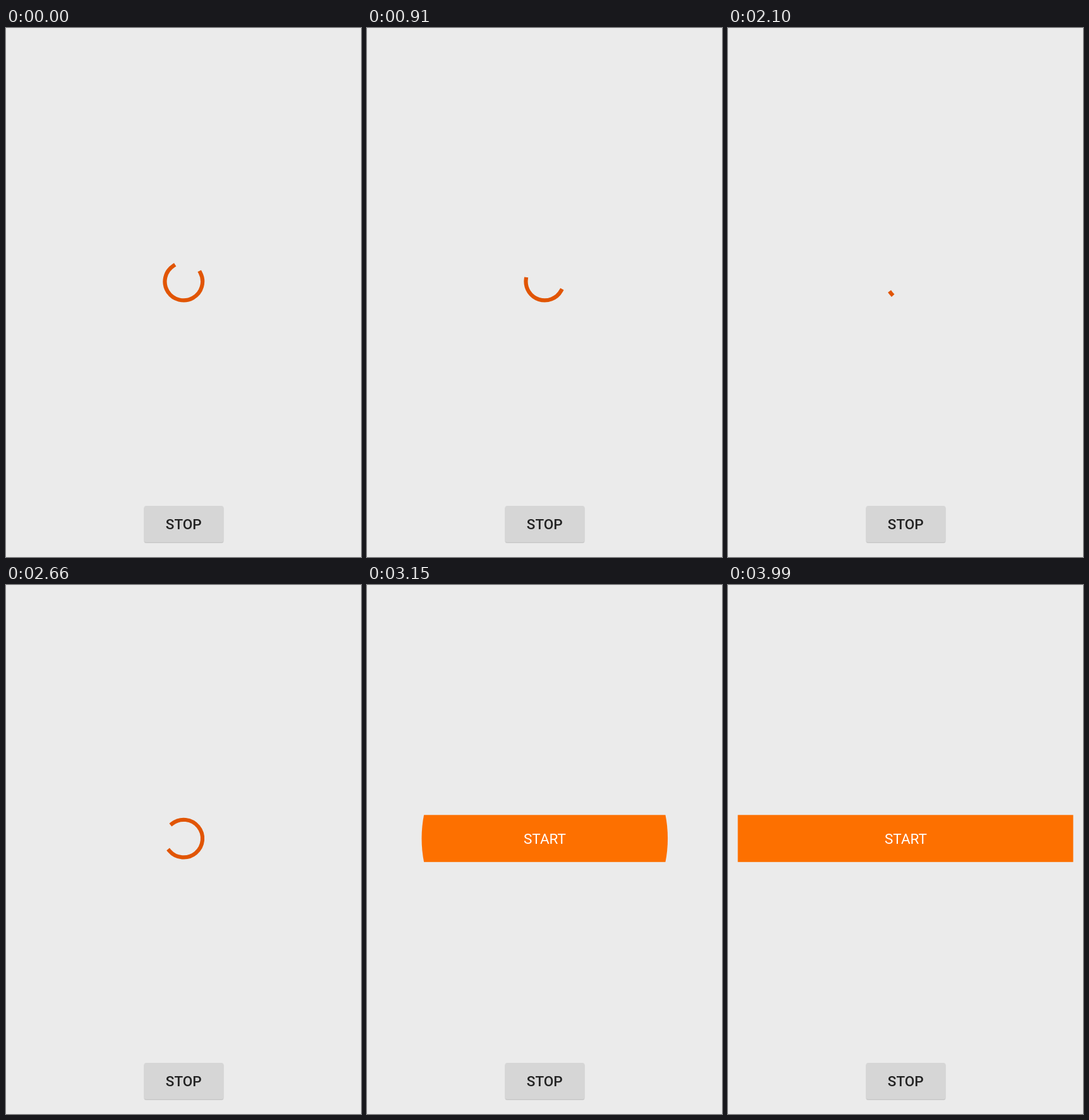
Write an HTML page that moves like this. It is 562 by 838 pixels and loops after 4.55 s.

```html
<!DOCTYPE html>
<html lang="en">
<head>
<meta charset="utf-8">
<title>Loading button</title>
<style>
  html, body { margin: 0; width: 100%; height: 100%; overflow: hidden; background: #ebebeb; }
  svg { display: block; width: 100%; height: 100%; }
  text { font: 500 22.5px Roboto, "Open Sans", sans-serif; text-anchor: middle; }
</style>
</head>
<body>
<svg viewBox="0 0 562 838">
  <defs>
    <clipPath id="reveal"><circle id="hole" cx="281.3" cy="401.6" r="0"/></clipPath>
  </defs>
  <rect width="562" height="838" fill="#ebebeb"/>
  <path id="arc" fill="none" stroke="#e15504" stroke-width="6.2" stroke-linecap="square"/>
  <g id="start" clip-path="url(#reveal)">
    <rect x="15.5" y="364.3" width="531" height="74.5" fill="#fd7000"/>
    <text x="281.5" y="410" fill="#fff" style="font-weight:400">START</text>
  </g>
  <rect x="218.5" y="758" width="126" height="58" rx="3.5" fill="#c9c9c9"/>
  <rect x="218.5" y="757" width="126" height="57.5" rx="3.5" fill="#d6d6d6"/>
  <text x="281.3" y="794" fill="#222">STOP</text>
</svg>
<script>
const LOOP = 4550, STEP = 70;
const CX = 281.3, CY = 401.6, R = 29.8;
const CYCLE = 20;           // steps per spinner cycle
const PHASE = 0.543;        // spinner phase at the start of the loop
const REVEAL = 39, REVEAL_STEPS = 12.57, REVEAL_R = 268;

const arc = document.getElementById('arc');
const start = document.getElementById('start');
const hole = document.getElementById('hole');

// Cubic ease through (.2,0) (.1,1), finished at x = .5
function ease(x) {
  if (x <= 0) return 0;
  if (x >= 0.5) return 1;
  let lo = 0, hi = 1;
  for (let i = 0; i < 24; i++) {
    const s = (lo + hi) / 2, q = 1 - s;
    const bx = 0.6 * q * q * s + 0.3 * q * s * s + 0.5 * s * s * s;
    if (bx < x) lo = s; else hi = s;
  }
  return lo * lo * (3 - 2 * lo);
}

function point(deg) {
  const a = deg * Math.PI / 180;
  return (CX + R * Math.sin(a)).toFixed(3) + ' ' + (CY - R * Math.cos(a)).toFixed(3);
}

function spinner(step) {
  const p = PHASE + step / CYCLE, k = Math.floor(p), u = p - k;
  const base = -70 + 234 * p + 270 * k;
  const tail = base + 270 * ease(u - 0.5);
  const head = Math.max(base + 270 * ease(u), tail + 0.5);
  const large = head - tail > 180 ? 1 : 0;
  arc.setAttribute('d', `M${point(tail)}A${R} ${R} 0 ${large} 1 ${point(head)}`);
}

function render(ms) {
  const step = Math.floor((ms % LOOP) / STEP);
  const open = step > REVEAL;
  arc.style.display = open ? 'none' : '';
  start.style.display = open ? '' : 'none';
  if (open) {
    const left = 1 - Math.min(1, (step - REVEAL) / REVEAL_STEPS);
    hole.setAttribute('r', REVEAL_R * (1 - left * left) + (left ? 0 : 2));
  } else {
    spinner(step);
  }
}

const t0 = performance.now();
function tick() {
  render(performance.now() - t0);
  requestAnimationFrame(tick);
}
render(0);
requestAnimationFrame(tick);
</script>
</body>
</html>
```
